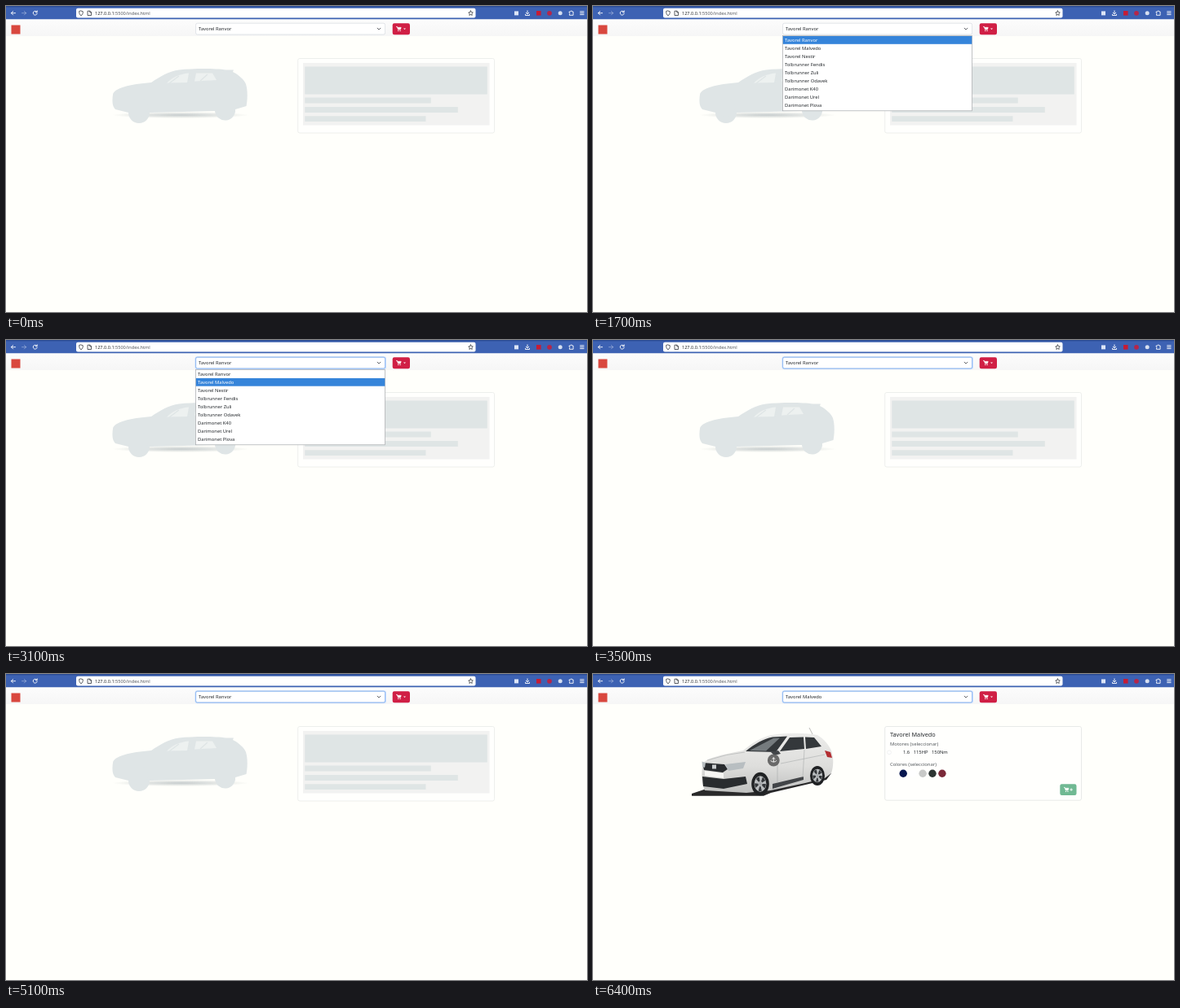
Write an HTML page that moves like this. It is 712x376 px and loops after 8 s.

```html
<!DOCTYPE html>
<html lang="es">
<head>
<meta charset="utf-8">
<title>Autos</title>
<style>
html, body { margin: 0; width: 100%; height: 100%; overflow: hidden; background: #fffffb; }
svg { display: block; width: 712px; height: 376px; font: 5.8px "Noto Sans", "Open Sans", sans-serif; fill: #24282c; }
.line { fill: none; stroke: #fff; stroke-width: .9; stroke-linecap: round; stroke-linejoin: round; }
.dark { stroke: #33363d; stroke-width: .8; }
.medium { font-weight: 500; }

/* One 8 s loop made of hard cuts */
.ring, .menu, .mark, .before, .after { animation: 8s step-end infinite; }
.ring { animation-name: ring; }
.menu { animation-name: menu; }
.mark { animation-name: mark; }
.second { animation-name: second; }
.before { animation-name: before; }
.after { animation-name: after; }
@keyframes ring { 0% { opacity: 0; } 22.5%, 100% { opacity: 1; } }
@keyframes menu {
  0% { opacity: 0; } 21.25% { opacity: 1; } 43.75% { opacity: 0; }
  56.25% { opacity: 1; } 63.75%, 100% { opacity: 0; }
}
@keyframes mark { 0% { opacity: 1; } 33.75% { opacity: 0; } 56.25% { opacity: 1; } 61.25%, 100% { opacity: 0; } }
@keyframes second { 0% { opacity: 0; } 33.75% { opacity: 1; } 56.25% { opacity: 0; } 61.25%, 100% { opacity: 1; } }
@keyframes before { 0% { opacity: 1; } 65%, 100% { opacity: 0; } }
@keyframes after { 0% { opacity: 0; } 65%, 100% { opacity: 1; } }
</style>
</head>
<body>
<svg viewBox="0 0 712 376">
  <defs>
    <g id="cart">
      <path d="M0 .4h1.2l1 3.5h3l.8-2.6H1.6z" fill="#fff" stroke="#fff" stroke-width=".6" stroke-linejoin="round"/>
      <circle cx="2.5" cy="5.4" r=".7" fill="#fff"/><circle cx="4.9" cy="5.4" r=".7" fill="#fff"/>
    </g>
    <g id="wheel">
      <circle r="12" fill="#202224"/>
      <circle r="8.2" fill="#b9bcbe"/>
      <circle r="5.2" fill="none" stroke="#34373a" stroke-width="4.8" stroke-dasharray="3.3 3.23"/>
      <circle r="2" fill="#a5a8ab"/>
    </g>
    <linearGradient id="paint" x2="0" y2="1">
      <stop stop-color="#ececea"/><stop offset=".55" stop-color="#dededc"/><stop offset="1" stop-color="#bfc0bf"/>
    </linearGradient>
    <linearGradient id="nav" x2="0" y2="1">
      <stop stop-color="#fcfcfc"/><stop offset="1" stop-color="#f6f6f6"/>
    </linearGradient>
    <radialGradient id="shade">
      <stop stop-color="#c5cbcb"/><stop offset="1" stop-color="#c5cbcb" stop-opacity="0"/>
    </radialGradient>
  </defs>

  <rect width="712" height="376" fill="#fffffb"/>

  <!-- Browser bar -->
  <rect width="712" height="16.5" fill="#3d62b3"/>
  <rect width="712" height="1.4" fill="#2b4b94"/>
  <rect x="86" y="2.8" width="489.5" height="11.6" rx="2" fill="#fff"/>
  <g class="line">
    <path d="M11.5 8.7h-5M8.6 6.5 6.4 8.7l2.2 2.2"/>
    <path d="M19.5 8.7h5M22.4 6.5l2.2 2.2-2.2 2.2" opacity=".4"/>
    <path d="M37.8 7.2a2.5 2.5 0 1 0 .4 2M38.2 5.8v1.9h-1.9"/>
    <path d="M639 5.8v4M637.2 8.2l1.8 1.8 1.8-1.8M636.5 10.3v1.2h5v-1.2"/>
    <path d="M690.5 7h1.3a1 1 0 0 1 2 0h1.3v4.3h-4.6v-1.4a.9.9 0 0 0 0-1.6z"/>
    <path d="M703.7 6.8h4.4M703.7 8.7h4.4M703.7 10.6h4.4"/>
  </g>
  <g class="line dark">
    <path d="M92 6l2.3.8c0 2.5-.5 3.8-2.3 5-1.8-1.2-2.3-2.5-2.3-5z"/>
    <path d="M100.4 6.2h2.4l1.7 1.7v3.6h-4.1zM102.8 6.2v1.7h1.7"/>
    <path d="M569.5 5.9l.9 1.8 1.9.3-1.4 1.4.3 2-1.7-.9-1.7.9.3-2-1.4-1.4 1.9-.3z"/>
  </g>
  <rect x="623" y="6.4" width="5" height="5" fill="#dce5f7"/>
  <rect x="650" y="6" width="5.6" height="5.6" fill="#c51c35"/>
  <circle cx="666" cy="8.8" r="2.9" fill="#b5264a"/>
  <circle cx="679.2" cy="8.8" r="2.5" fill="#d7dff0"/>
  <text x="109" y="10.9" font-size="5.57" class="medium">127.0.0.1<tspan fill="#555960" font-weight="400">:5500/index.html</tspan></text>

  <!-- Site header -->
  <rect y="16.5" width="712" height="20.5" fill="url(#nav)"/>
  <rect x="6.5" y="23.5" width="11" height="11" fill="#d9483f"/>
  <rect class="ring" x="231.5" y="20.2" width="234.5" height="15.8" rx="3" fill="#c2dbfe"/>
  <rect x="232.6" y="21.2" width="232" height="13.8" rx="2" fill="#fff" stroke="#cfd4da" stroke-width=".6"/>
  <rect class="ring" x="232.6" y="21.2" width="232" height="13.8" rx="2" fill="none" stroke="#7fb0f5" stroke-width=".8"/>
  <path class="line dark" d="M455.2 27.2l1.9 1.9 1.9-1.9"/>
  <text class="before" x="236" y="30.1" data-car="0"></text>
  <text class="after" x="236" y="30.1" data-car="1"></text>
  <rect x="473.7" y="21.2" width="21.3" height="14" rx="2.2" fill="#d01f45"/>
  <use href="#cart" x="478.2" y="25"/>
  <path d="M487 27.5h3l-1.5 1.6z" fill="#fff"/>

  <!-- Placeholder -->
  <g class="before">
    <ellipse cx="214" cy="134" rx="84" ry="4" fill="url(#shade)"/>
    <path fill="#dfe5e6" d="M131 109C132 101 152 96 178 94C190 86 200 80 212 78.5C230 76.5 256 76.5 270 78.5L279 78.5 278 81C286 85 292 91 294 96C296.500 104 296 116 294.500 123L281 127A12.500 12.500 0 0 1 256 129L176 131A13 13 0 0 1 150 131L134 127C130 123 130 116 131 109Z"/>
    <circle cx="163" cy="124" r="11.5" fill="#dfe5e6"/><circle cx="268" cy="124" r="11.5" fill="#dfe5e6"/>
    <path fill="#edf1f0" d="M197 94.500C204 88 212 83.500 224 82.500L222 94ZM231 92.500 233 82.500 253 82.500 258 91Z"/>
    <path d="M226 83l-3 12M200 95l12-9M238 92l9-8" stroke="#dfe5e6" stroke-width="1.4"/>
    <rect x="357.700" y="64.500" width="240.800" height="91.500" rx="2.200" fill="#fffffd" stroke="#e6e8e6" stroke-width=".7"/>
    <rect x="364" y="70" width="228.500" height="76.500" fill="#f2f2f1"/>
    <path fill="#dfe5e5" d="M366.300 74.500h223.500v34h-223.500zM366.300 112.500h154.500v7h-154.500zM366.300 124h187.500v7h-187.500zM366.300 135.200h148.200v6.800h-148.200z"/>
  </g>

  <!-- Chosen car -->
  <g class="after">
    <path fill="#29292a" d="M121 149.700V147L136 142 200 132 292 122 286 130 218 146 209 149.700Z"/>
    <path fill="url(#paint)" d="M134 112C136 105 148 101 184 94C196 84 208 77 219 75C237 72 259 72 275 75C283 80 289 87 292 94C295 102 295 113 292 122L284 128 260 134 218 143 188 146 137 143C133 135 133 122 134 112Z"/>
    <path fill="#34383b" d="M187 95C198 86 208 80 220 77.500L238 76.500 224 96ZM229 95 241 78 258 77.500 259 92ZM261 92 260 77.500 271 78 280 89Z"/>
    <path fill="#757b7e" d="M192 94 221 79 229 78.500 212 94.500Z"/>
    <path fill="#292c2f" d="M134 109 161 111 165 117 159 121 136 118ZM134 126 160 129 187 126 189 135 160 141 135 138Z"/>
    <path fill="#b8bec1" d="M162 111 187 108 184 116 166 119ZM133.500 107.500 138 109 137 115 134 114Z"/>
    <path fill="#f6f6f4" d="M137 119 160 122V128L137 125Z"/>
    <path fill="#424548" d="M220 135 258 126V130L220 141ZM218 96l9-2 3 4-8 2z"/>
    <path d="M226 99v35M259 93l-2 34M140 106q24-8 46-10M230 110l54-11" fill="none" stroke="#aaadad" stroke-width=".6"/>
    <path d="M269 74l-4-8" stroke="#777" stroke-width=".5"/>
    <path fill="#b32e32" d="M284 94 291 96 293 103 287 102Z"/>
    <rect x="146" y="111.500" width="5" height="5" fill="#c9ccce"/>
    <use href="#wheel" transform="translate(205 135) scale(.9 1.180)"/>
    <use href="#wheel" transform="translate(275 125) scale(.75 1)"/>
    <circle cx="221.300" cy="106" r="7.400" fill="#626262" opacity=".94"/>
    <path class="line" stroke-width=".7" d="M221.300 108v-5M219.800 104.300l1.500-1.500 1.500 1.500M218 106.500c-1 2 7.600 2 6.600 0"/>

    <rect x="357.700" y="64.500" width="240.800" height="90.700" rx="2.200" fill="#fffffd" stroke="#dfe1e0" stroke-width=".7"/>
    <text class="medium" x="364" y="77.200" font-size="7.300" data-car="1"></text>
    <text class="medium" x="364" y="87.800" font-size="5.900" fill="#555a5e">Motores (seleccionar)</text>
    <circle cx="363" cy="96.300" r="2.400" fill="#fff" stroke="#e3e5e5" stroke-width=".5"/>
    <text y="98.300"><tspan x="380">1.6</tspan><tspan x="392.700">115HP</tspan><tspan x="415">150Nm</tspan></text>
    <text class="medium" x="364" y="113.200" font-size="5.900" fill="#555a5e">Colores (seleccionar)</text>
    <circle cx="380.200" cy="122.300" r="4.700" fill="#07174f"/>
    <circle cx="392.200" cy="122.300" r="4.700" fill="#fff"/>
    <circle cx="404.100" cy="122.300" r="4.700" fill="#c8c9c8"/>
    <circle cx="416" cy="122.300" r="4.700" fill="#2c3432"/>
    <circle cx="427.900" cy="122.300" r="4.700" fill="#7b2a39"/>
    <rect x="572.300" y="135.200" width="20.200" height="13.800" rx="2.200" fill="#70b993"/>
    <use href="#cart" x="577" y="139"/>
    <path class="line" d="M584.800 142.100h2.600M586.100 140.800v2.600"/>
  </g>

  <!-- Open list -->
  <g class="menu">
    <rect x="232.400" y="36.400" width="232.200" height="92.400" fill="#fff" stroke="#a6a9ac" stroke-width=".7"/>
    <g id="options"></g>
    <g class="mark"><rect x="232.800" y="37" width="231.500" height="9.800" fill="#3584da"/><text x="235" y="43.800" fill="#fff" data-car="0"></text></g>
    <g class="mark second"><rect x="232.800" y="46.900" width="231.500" height="9.800" fill="#3584da"/><text x="235" y="53.800" fill="#fff" data-car="1"></text></g>
  </g>
</svg>
<script>
const cars = [
  "Tavorel Ranvor", "Tavorel Malvedo", "Tavorel Nestir",
  "Tolbrunner Fendis", "Tolbrunner Zuli", "Tolbrunner Odavek",
  "Darimonet K40", "Darimonet Urel", "Darimonet Plova"
];
document.getElementById("options").innerHTML = cars
  .map((name, i) => `<text x="235" y="${43.8 + i * 10}">${name}</text>`).join("");
for (const label of document.querySelectorAll("[data-car]")) {
  label.textContent = cars[label.dataset.car];
}
</script>
</body>
</html>
```
